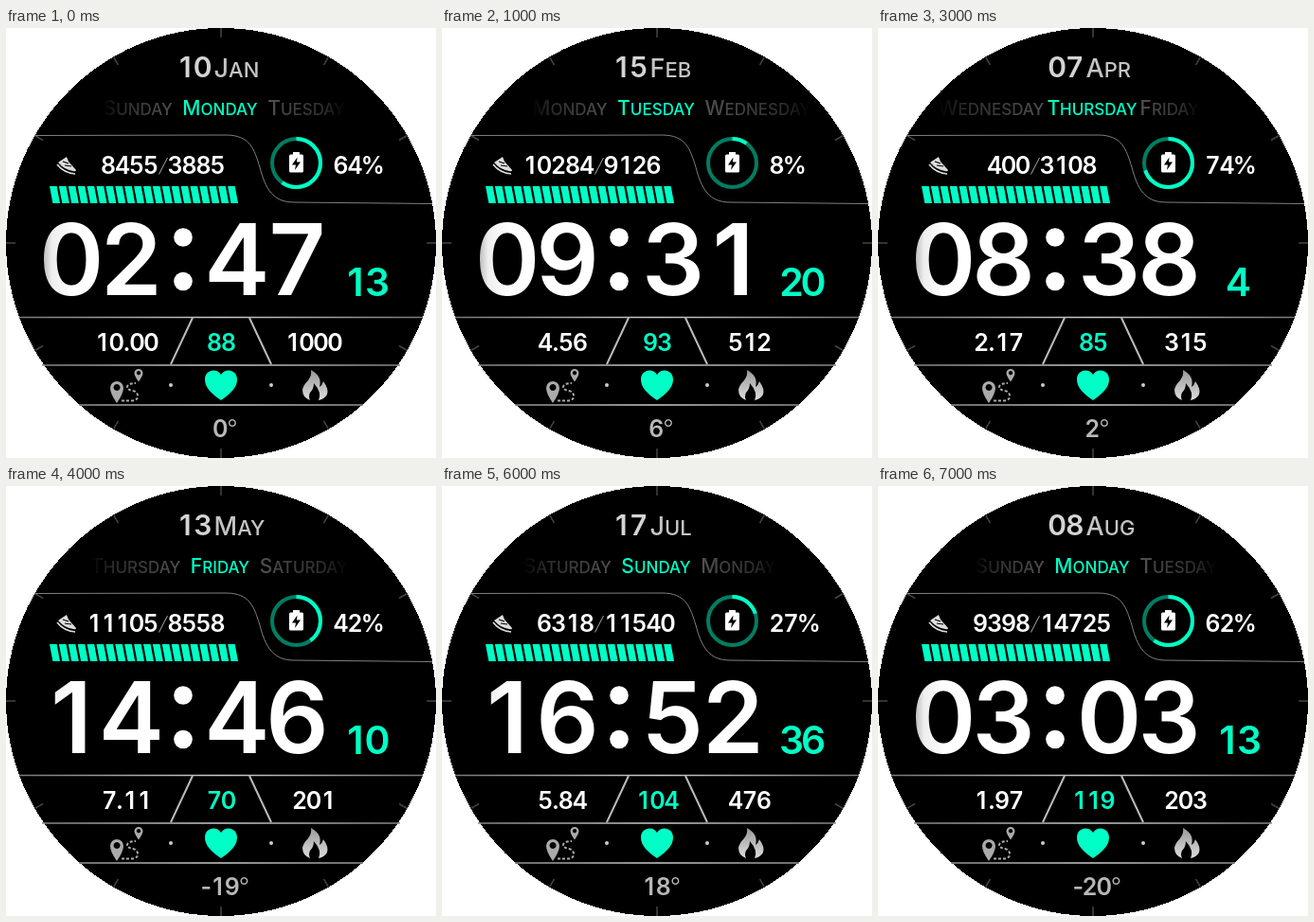
Recreate the animation shown at these times as an HTML page. Size 454 px wide and 454 px high, loop 8000 ms.

```html
<!DOCTYPE html>
<html>
<head>
<meta charset="utf-8">
<style>
html, body { margin: 0; width: 100%; height: 100%; overflow: hidden; background: #fff; }
svg { display: block; }
text { font-family: Inter, sans-serif; font-weight: 600; fill: #fff; }
.number { text-anchor: middle; font-size: 25px; }
.teal { fill: #00ffc6; }
.name { font-weight: 500; }
.line { fill: none; stroke: url(#rule); stroke-width: 1.6; }
#clock { font-size: 104px; fill: url(#shade); }
#day { font-size: 30px; fill: #d4d4d4; }
#month { font-weight: 500; fill: #c4c4c4; }
#seconds { font-size: 41px; }
#degrees { fill: #b8b8b8; }
#degrees tspan { font-weight: 300; }
#before { fill: url(#fadeIn); }
#after { fill: url(#fadeOut); }
</style>
</head>
<body>
<svg width="454" height="454" viewBox="0 0 454 454">
  <defs>
    <linearGradient id="shade" gradientUnits="userSpaceOnUse" x1="36" x2="72" y1="0" y2="0">
      <stop stop-color="#aaa"/><stop offset=".35" stop-color="#eee"/><stop offset="1" stop-color="#fff"/>
    </linearGradient>
    <linearGradient id="rule" gradientUnits="userSpaceOnUse" x1="10" x2="444" y1="0" y2="0">
      <stop stop-color="#777"/><stop offset=".5" stop-color="#ccc"/><stop offset="1" stop-color="#777"/>
    </linearGradient>
    <linearGradient id="fadeIn">
      <stop stop-color="#000"/><stop offset=".25" stop-color="#2c2c2c"/><stop offset="1" stop-color="#505050"/>
    </linearGradient>
    <linearGradient id="fadeOut">
      <stop stop-color="#505050"/><stop offset=".75" stop-color="#2c2c2c"/><stop offset="1" stop-color="#000"/>
    </linearGradient>
    <linearGradient id="grey" x2="0" y2="1">
      <stop stop-color="#999"/><stop offset="1" stop-color="#ddd"/>
    </linearGradient>
  </defs>

  <circle cx="227" cy="227" r="227" shape-rendering="crispEdges"/>
  <g id="ticks" stroke="#444" stroke-width="1.5"></g>

  <path d="M30 113.500L232 113C258 113 262 128 268 147C274 170 282 184 304 184L450 185.500" fill="none" stroke="#808080"/>
  <path class="line" d="M14 305.500H440M38 356H416M77 398H377"/>
  <path d="M197 306L174 355M257 306L280 355" stroke="#bbb" stroke-width="2"/>

  <text id="day" class="number" y="52"></text>
  <text id="month" x="219.500" y="52"></text>

  <text id="before" class="name" y="92"></text>
  <text id="today" class="name teal" y="92"></text>
  <text id="after" class="name" y="92"></text>

  <g transform="translate(53 136)" fill="#ddd">
    <path d="M2 6L11 0L13 5L21 14Q21 16 18 15Q9 14 2 6Z"/>
    <path d="M1 8Q8 17 20 18" fill="none" stroke="#ddd" stroke-width="1.600"/>
    <path d="M7 5L13 7M9 9L16 10" stroke="#000" stroke-width="1.200"/>
  </g>
  <text id="steps" class="number" y="154"></text>
  <path d="M161.500 154.500L170.500 137" stroke="#aaa"/>
  <text id="goal" class="number" y="154"></text>
  <g id="bars" class="teal"></g>

  <circle cx="306.500" cy="142.500" r="25.500" fill="none" stroke="#007d62" stroke-width="4"/>
  <circle id="charge" cx="306.500" cy="142.500" r="25.500" fill="none" stroke="#00ffc6" stroke-width="4"
          pathLength="100" transform="rotate(-90 306.500 142.500)"/>
  <path d="M303 131h7v2.500h2.500q1.500 0 1.500 1.500v16q0 1.500 -1.500 1.500h-12q-1.500 0 -1.500 -1.500v-16q0 -1.500 1.500 -1.500h2.500z" fill="#fff"/>
  <path d="M307.500 136.500L302 144.500H306L305 150L311 141.500H307Z"/>
  <text id="percent" class="number" y="154"></text>

  <text id="clock" class="number" x="69 132.500 244 307.500" y="281.500"></text>
  <circle cx="187" cy="221" r="9.800" fill="#fff"/>
  <circle cx="187" cy="267.500" r="9.800" fill="#fff"/>
  <text id="seconds" class="number teal" y="283"></text>

  <text id="distance" class="number" y="341"></text>
  <text id="pulse" class="number teal" y="341"></text>
  <text id="calories" class="number" y="341"></text>

  <g fill="#aaa" fill-rule="evenodd">
    <path d="M117 396Q110 386 110 380A7 7 0 0 1 124 380Q124 386 117 396ZM117 376a3.500 3.500 0 1 0 .1 0Z"/>
    <path d="M140 373.500Q135.500 367 135.500 364.500A4.500 4.500 0 0 1 144.500 364.500Q144.500 367 140 373.500ZM140 362a2.200 2.200 0 1 0 .1 0Z"/>
    <path d="M122 393.500H133C142 393 140 384 134 383C125 382 126 375 137 375" fill="none" stroke="#aaa" stroke-width="2" stroke-dasharray="3 2"/>
    <path fill="url(#grey)" d="M322 361C331 366 333 372 331 379Q334 377 335 373Q341 381 339 387Q336 392 330 393Q334 385 325 375Q325 381 321 385Q319 389 321 393Q313 390 313 382Q314 377 319 372Q323 367 322 361Z"/>
  </g>
  <path class="teal" d="M227 393C217 386 210 380 210 371C210 361 222 358 227 366C232 358 244 361 244 371C244 380 237 386 227 393Z"/>
  <path d="M174 377h.01M280 377h.01" stroke="#ccc" stroke-width="4" stroke-linecap="round"/>
  <text id="degrees" class="number" y="432"></text>
</svg>
<script>
const $ = id => document.getElementById(id);
const week = ["Sunday", "Monday", "Tuesday", "Wednesday", "Thursday", "Friday", "Saturday"];
// date, weekday, steps, goal, battery, time, seconds, distance, pulse, calories, temperature
const scenes = `10 Jan 1 8455 3885 64 0247 13 10.00 88 1000 0
15 Feb 2 10284 9126 8 0931 20 4.56 93 512 6
23 Mar 3 13942 8610 3 1426 50 2.32 117 48 4
07 Apr 4 400 3108 74 0838 4 2.17 85 315 2
13 May 5 11105 8558 42 1446 10 7.11 70 201 -19
11 Jun 6 7279 12663 94 0845 55 8.10 118 92 35
17 Jul 0 6318 11540 27 1652 36 5.84 104 476 18
08 Aug 1 9398 14725 62 0303 13 1.97 119 203 -20`.split("\n").map(row => row.split(" "));

const caps = (word, big, small) =>
  `<tspan font-size="${big}">${word[0]}</tspan><tspan font-size="${small}">${word.slice(1).toUpperCase()}</tspan>`;

for (let i = 0; i < 12; i++)
  $("ticks").innerHTML += `<path d="M227 0V10" transform="rotate(${i * 30} 227 227)"/>`;
for (let i = 0; i < 20; i++)
  $("bars").innerHTML += `<path d="M${46 + i * 9.9} 167h7.600l3.400 18h-7.600z"/>`;

// Equal digit cells; align is 0 for left, .5 for centre, 1 for right.
const cells = { ".": .45, "%": 1.5, "-": .65, "°": .7 };
function setNumber(id, text, x, align, pitch = 15) {
  const widths = [...text].map(char => (cells[char] || 1) * pitch);
  let left = x - align * widths.reduce((sum, width) => sum + width);
  $(id).setAttribute("x", widths.map(width => (left += width) - width / 2).join(" "));
  $(id).innerHTML = text.replace("°", "<tspan>°</tspan>");
}

function setWeek(index) {
  const place = (id, offset) => {
    $(id).innerHTML = caps(week[(index + offset + 7) % 7], 21, 17);
    return $(id).getComputedTextLength();
  };
  const left = place("before", -1), width = place("today", 0);
  place("after", 1);
  const gap = index === 4 ? 3 : 10.5, start = 226 - width / 2;
  $("today").setAttribute("x", start);
  $("before").setAttribute("x", start - gap - left);
  $("after").setAttribute("x", start + width + gap);
}

function show([day, month, weekday, steps, goal, battery, time, seconds, distance, pulse, calories, degrees]) {
  setNumber("day", day, 217, 1, 18.5);
  $("month").innerHTML = caps(month, 27, 22);
  setWeek(+weekday);
  setNumber("steps", steps, 160.5, 1);
  setNumber("goal", goal, 171, 0);
  setNumber("percent", battery + "%", 346, 0);
  $("charge").setAttribute("stroke-dasharray", `${Math.max(1, Math.floor(battery / 10)) * 10} 100`);
  $("clock").textContent = time;
  setNumber("seconds", seconds, 380.5, .5, 23);
  setNumber("distance", distance, 127.5, .5);
  setNumber("pulse", pulse, 227.5, .5);
  setNumber("calories", calories, 325, .5);
  setNumber("degrees", degrees + "°", 231.5, .5);
}

let current = -1;
function frame() {
  const index = Math.floor(performance.now() / 1000) % scenes.length;
  if (index !== current) show(scenes[current = index]);
  requestAnimationFrame(frame);
}
frame();
</script>
</body>
</html>
```
